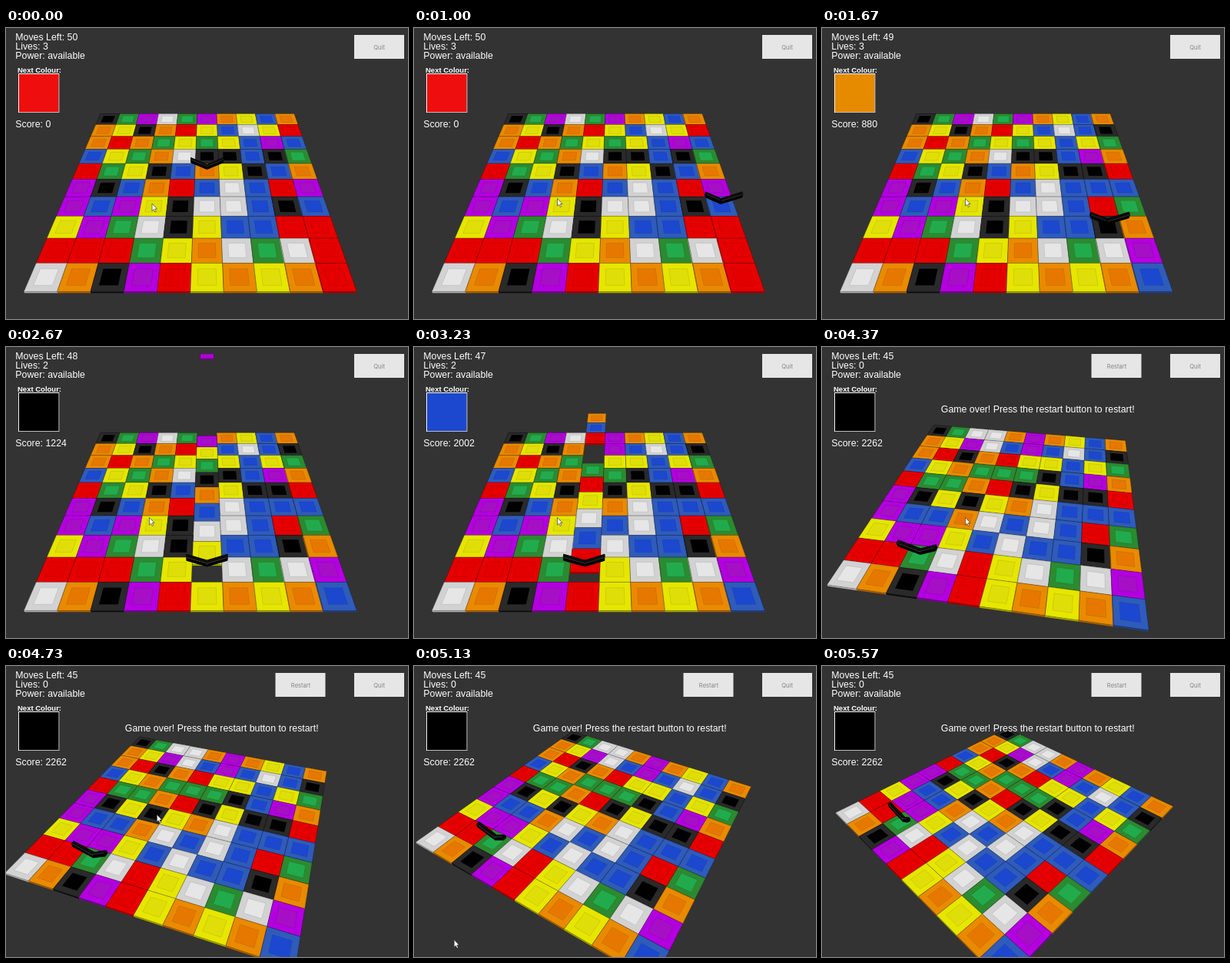
Animation of 523x378 px, one loop 5610 ms. Source, as an HTML page with a canvas:

```html
<!DOCTYPE html>
<html lang="en">
<head>
<meta charset="utf-8">
<title>Tile game</title>
<style>
  html, body { margin: 0; width: 100%; height: 100%; overflow: hidden; background: #333; }
  canvas, svg { position: absolute; left: 0; top: 0; width: 523px; height: 378px; }
  text { font: 12.35px "Liberation Sans", Arial, sans-serif; fill: #fff; }
  .label { font-size: 9.5px; font-weight: bold; }
  .btn rect { fill: #e6e6e6; }
  .btn text { font: 7.6px Inter, sans-serif; fill: #858585; text-anchor: middle; }
</style>
</head>
<body>
<canvas id="board" width="523" height="378"></canvas>
<svg viewBox="0 0 523 378">
  <text id="moves" x="12.3" y="15.6"></text>
  <text id="lives" x="12.3" y="27.8"></text>
  <text x="12.3" y="40">Power: available</text>
  <text class="label" x="15" y="58">Next Colour:</text>
  <rect x="16" y="59" width="53.4" height="51" fill="#bdbdbd"/>
  <path d="M16.5 110V59.5H69" fill="none" stroke="#f4f4f4"/>
  <rect id="next" x="17" y="60" width="51.4" height="49"/>
  <text id="score" x="12.3" y="129.4"></text>
  <g class="btn"><rect x="453" y="9" width="65" height="31"/><text x="485.6" y="27.6">Quit</text></g>
  <g id="over">
    <g class="btn"><rect x="350.5" y="9" width="65" height="31"/><text x="383.6" y="27.6">Restart</text></g>
    <text x="154.8" y="84.6">Game over! Press the restart button to restart!</text>
  </g>
  <path id="mouse" d="M0 0V9.6L2.1 7.7L3.8 11L5.3 10.3L3.7 7H6.5Z" fill="#fff" stroke="#222" stroke-width=".6"/>
</svg>
<script>
const LOOP = 5610, TICK = 100 / 3, FALL = 237, OVER = 4070;
const $ = id => document.getElementById(id);
const ctx = $('board').getContext('2d');

// rim, centre, side
const COLOURS = {
  W: ['#d2d2d2', '#e6e6e6', '#b4b4b4'], R: ['#e60000', '#e40000', '#a80000'],
  O: ['#e98a00', '#e67800', '#b06400'], Y: ['#e6e600', '#e0de08', '#aaaa00'],
  G: ['#2c8a30', '#22ab4c', '#1c601f'], B: ['#2f5bbb', '#1c48d0', '#203f86'],
  P: ['#b400e0', '#a60fc6', '#7c009c'], K: ['#2a2a2a', '#000', '#0a0a0a']
};
const NEXT = { R: '#ee0e0e', O: '#e68a00', K: '#000', Y: '#fff000', B: '#1c48d0' };

// columns left to right, each from front to back
const COLUMNS = ['WRYPPRBOOK', 'ORPBKGYRYG', 'KRGPBYGOKP', 'PGWYOKOGOW', 'RYKKRBWYRG',
  'YOYWBOKGYP', 'OWBWWYKYBO', 'YGBBBKBBWY', 'OWRKRBKPYB', 'RRRBPOGBRO'];

// drops: column, first removed row, tiles that refill it
const SHOTS = [
  { t: -1000, moves: 50, lives: 3, next: 'R', score: 0, drops: [] },
  { t: 1370, moves: 49, lives: 3, next: 'O', score: 880, drops: [[8, 2, 'B'], [9, 0, 'GKO']] },
  { t: 2600, moves: 48, lives: 2, next: 'K', score: 1224, drops: [[5, 1, 'P']] },
  { t: 3030, moves: 47, lives: 2, next: 'B', score: 2002, drops: [[4, 1, 'RBO']] },
  { t: 3600, moves: 46, lives: 1, next: 'Y', score: 2132, drops: [[3, 1, 'W']] },
  { t: OVER, moves: 45, lives: 0, next: 'K', score: 2262, drops: [[2, 1, 'W']] }
];

// time, column, row
const CURSOR = [[0, 5, 5], [370, 6, 5], [530, 7, 5], [670, 8, 5], [770, 8, 4], [930, 9, 4],
  [1000, 9, 3], [1230, 9, 2], [1670, 8, 2], [1830, 7, 2], [1970, 6, 2], [2130, 5, 2],
  [2470, 5, 1], [2870, 4, 1], [3330, 3, 1], [3900, 2, 1]];

// time, x, y
const MOUSE = [[0, 190, 228], [40, 190, 228], [360, 186.5, 221.5], [4580, 186.5, 221.5],
  [4730, 199, 190], [5130, 53.5, 353], [5240, 34, 392], [LOOP, 34, 392]];

let state = COLUMNS.map(s => [...s]);
for (const shot of SHOTS) {
  state = state.map(c => c.slice());
  shot.start = state.map(c => c.map((_, r) => r));
  for (const [c, row, fill] of shot.drops) {
    const n = fill.length;
    state[c].splice(row, n);
    state[c].push(...fill);
    shot.start[c] = state[c].map((_, r) => r < row ? r : r < 10 - n ? r + n : r + 16);
  }
  shot.cols = state;
}

const lastBy = (list, now, time) => list.filter(e => time(e) <= now).pop();

function between(keys, t) {
  const i = Math.max(1, keys.findIndex(k => k[0] > t));
  const [a, b] = [keys[i - 1], keys[i]];
  const f = (t - a[0]) / (b[0] - a[0]);
  return [a[1] + (b[1] - a[1]) * f, a[2] + (b[2] - a[2]) * f];
}

// orbiting camera aimed at the middle of the board
function makeCamera(now) {
  const spin = Math.max(0, now - OVER);
  const a = spin * 0.0289 * Math.PI / 180;
  const dist = 10.97 * (1 + spin * 2.8e-6), high = 9.56, focal = 451.8;
  const tilt = Math.atan2(high + 0.13, dist);
  const [ca, sa, ct, st] = [Math.cos(a), Math.sin(a), Math.cos(tilt), Math.sin(tilt)];
  return (x, z, h = 0) => {
    const u = x - 5, w = z - 5;
    const side = u * ca + w * sa, away = dist - u * sa + w * ca;
    const depth = away * ct + (high - h) * st;
    const up = away * st - (high - h) * ct;
    return [261.5 + focal * side / depth, 189 - focal * up / depth, depth];
  };
}

function poly(points, fill) {
  ctx.beginPath();
  points.forEach(p => ctx.lineTo(p[0], p[1]));
  ctx.closePath();
  ctx.fillStyle = fill;
  ctx.fill();
}

const square = (cam, x, z, s, h) =>
  [[-s, -s], [s, -s], [s, s], [-s, s]].map(([i, j]) => cam(x + i, z + j, h));

function drawTile(cam, x, z, kind) {
  const [rim, centre, side] = COLOURS[kind];
  const top = square(cam, x, z, 0.498, 0), base = square(cam, x, z, 0.498, -0.08);
  top.forEach((p, i) => {
    const j = (i + 1) % 4;
    poly([p, top[j], base[j], base[i]], side);
  });
  poly(top, rim);
  ctx.lineWidth = 0.6;
  ctx.strokeStyle = 'rgba(0,0,0,.38)';
  ctx.stroke();
  poly(square(cam, x, z, 0.29, 0), centre);
  ctx.strokeStyle = 'rgba(0,0,0,.16)';
  ctx.stroke();
}

// upright V made of two bars
function drawCursor(cam, x, z) {
  const bar = (s, dz, dh) => [cam(x + s * 0.67, z + 0.08 + dz, 0.53 + dh), cam(x, z + 0.18 + dz, 0.08 + dh)];
  for (const s of [-1, 1]) {
    const [a, b] = bar(s, -0.07, 0.09), [c, d] = bar(s, -0.07, -0.09);
    const [e, f] = bar(s, 0.07, 0.09), [g, h] = bar(s, 0.07, -0.09);
    poly([e, f, h, g], '#000');
    poly([a, e, g, c], '#000');
    poly([a, b, f, e], '#0c0c0c');
    poly([a, b, d, c], '#000');
    ctx.beginPath();
    ctx.moveTo(a[0], a[1]);
    ctx.lineTo(b[0], b[1]);
    ctx.lineWidth = 0.6;
    ctx.strokeStyle = '#4c4c4c';
    ctx.stroke();
  }
}

function draw(t) {
  const now = Math.floor((t + 3.4) / TICK) * TICK + 4;
  const shot = lastBy(SHOTS, now, s => s.t);
  const fall = Math.min(1, (now - shot.t) / FALL);
  const cam = makeCamera(now);

  const tiles = [];
  shot.cols.forEach((col, x) => col.forEach((kind, r) => {
    const z = shot.start[x][r] + (r - shot.start[x][r]) * fall;
    tiles.push({ x, z, kind, depth: cam(x, z)[2] });
  }));
  tiles.sort((a, b) => b.depth - a.depth);

  ctx.fillStyle = '#333';
  ctx.fillRect(0, 0, 523, 378);
  tiles.forEach(p => drawTile(cam, p.x, p.z, p.kind));
  const [, cx, cz] = lastBy(CURSOR, now, c => c[0]);
  drawCursor(cam, cx, cz);

  $('moves').textContent = 'Moves Left: ' + shot.moves;
  $('lives').textContent = 'Lives: ' + shot.lives;
  $('score').textContent = 'Score: ' + shot.score;
  $('next').setAttribute('fill', NEXT[shot.next]);
  $('over').setAttribute('visibility', now >= OVER ? 'visible' : 'hidden');
  $('mouse').setAttribute('transform', `translate(${between(MOUSE, Math.min(now, LOOP - 1))})`);
}

const begin = performance.now();
function frame() {
  draw((performance.now() - begin) % LOOP);
  requestAnimationFrame(frame);
}
frame();
</script>
</body>
</html>
```
